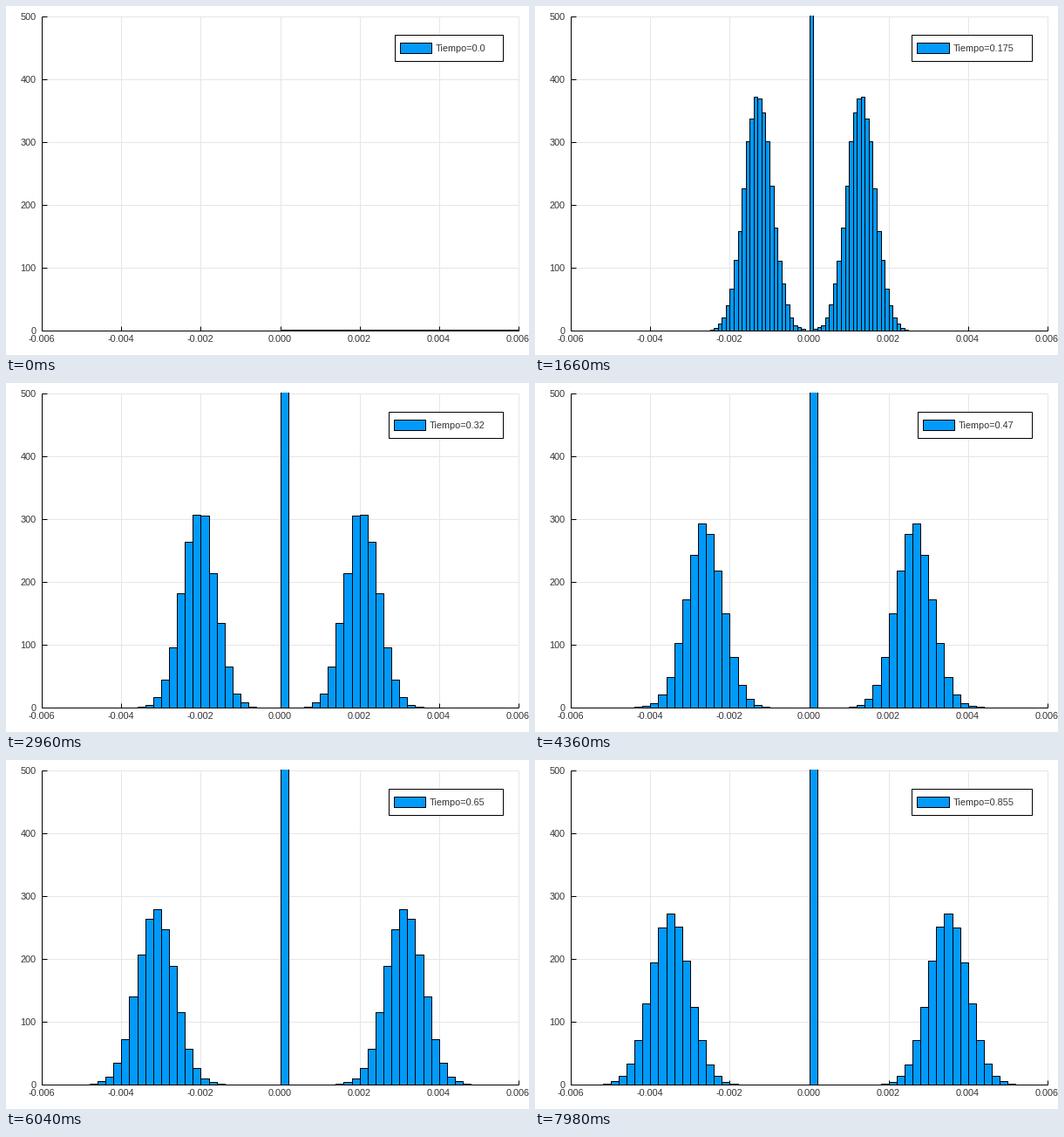
Recreate the animation shown at these times as a matplotlib script. Size 600 by 400 pixels, loop 8 s.

```python
import math
import numpy as np
import matplotlib.pyplot as plt
from matplotlib.animation import FuncAnimation
from matplotlib.collections import LineCollection, PolyCollection
from matplotlib.patches import Rectangle

W, H, DPI = 600, 400, 100
PX = 72 / DPI
LEFT, RIGHT, TOP, BOTTOM = 41.25, 587.85, 12, 372
X_MAX, Y_MAX = 6.0, 500  # x in thousandths
BLUE, INK = "#009afa", "#333333"

# Beam model: particles drift to LIMIT while they diffuse
N, STEPS, DT = 20000, 172, 0.005
LIMIT, TAU, SPREAD = 4.2, 0.475, 0.49
TARGET_BINS = 60

plt.rcParams["font.family"] = "Liberation Sans"
plt.rcParams["font.size"] = 7.8


def to_x(v):
    return LEFT + (v + X_MAX) / (2 * X_MAX) * (RIGHT - LEFT)


def to_y(v):
    return BOTTOM - v / Y_MAX * (BOTTOM - TOP)


def bin_width(t):
    """Round bin width (1, 2 or 5 times a power of ten) for the spread at t."""
    mean = LIMIT * (1 - math.exp(-t / TAU))
    sd = SPREAD * math.sqrt(1 - math.exp(-2 * t / TAU))
    raw = 2 * (mean + 3.86 * sd) / TARGET_BINS
    base = 10 ** math.floor(math.log10(raw))
    for limit, factor in ((1.1, 1), (2.2, 2), (5.5, 5)):
        if raw / base <= limit:
            return base * factor
    return base * 10


def bar(x0, x1, height):
    a, b, y = to_x(x0), to_x(x1), to_y(height)
    return [(a, BOTTOM), (a, y), (b, y), (b, BOTTOM)]


def histogram(pos, t):
    w = bin_width(t)
    k = math.ceil(np.abs(pos).max() / w)
    edges = np.arange(-k, k + 1) * w
    counts = np.histogram(pos, edges)[0]
    counts = counts + counts[::-1]
    counts[k] += N  # undeflected beam
    density = counts / (3 * N * w * 1e-3)
    return [bar(a, b, min(d, 2 * Y_MAX))
            for a, b, d in zip(edges, edges[1:], density)]


def simulate():
    rng = np.random.default_rng(7)
    decay = math.exp(-DT / TAU)
    kick = SPREAD * math.sqrt(1 - decay ** 2)
    pos = np.zeros(N)
    result = [[bar(0, X_MAX, 1)]]
    for i in range(1, STEPS):
        pos = LIMIT + (pos - LIMIT) * decay + kick * rng.standard_normal(N)
        result.append(histogram(pos, i * DT))
    return result


bars_at = simulate()

fig = plt.figure(figsize=(W / DPI, H / DPI), dpi=DPI, facecolor="white")
ax = fig.add_axes([0, 0, 1, 1])
ax.set_xlim(0, W)
ax.set_ylim(H, 0)
ax.axis("off")

grid, marks = [], [[(LEFT, TOP), (LEFT, BOTTOM)], [(LEFT, BOTTOM), (RIGHT, BOTTOM)]]
for v in range(-6, 7, 2):
    x = to_x(v)
    grid.append([(x, TOP), (x, BOTTOM)])
    marks.append([(x, BOTTOM), (x, BOTTOM - 5)])
    ax.text(x - 0.4, 385, f"{v / 1000:.3f}", ha="center", va="baseline", color=INK)
for v in range(0, 501, 100):
    y = to_y(v)
    grid.append([(LEFT, y), (RIGHT, y)])
    marks.append([(LEFT, y), (LEFT + 6, y)])
    ax.text(34.4, y + 4, str(v), ha="right", va="baseline", color=INK)
ax.add_collection(LineCollection(grid, colors="#e6e6e6", linewidths=PX, zorder=1))
ax.add_collection(LineCollection(marks, colors="black", linewidths=PX, zorder=2))

bars = PolyCollection([], facecolors=BLUE, edgecolors="black", linewidths=PX, zorder=3)
ax.add_collection(bars)
bars.set_clip_path(Rectangle((LEFT, TOP - 1), RIGHT - LEFT + 1, BOTTOM - TOP + 1,
                             transform=ax.transData))

frame = Rectangle((446, 33), 124, 30, fc="white", ec="black", lw=PX, zorder=4)
swatch = Rectangle((452, 42), 36.2, 12, fc=BLUE, ec="black", lw=PX, zorder=5)
ax.add_patch(frame)
ax.add_patch(swatch)
label = ax.text(493, 52, "", va="baseline", color=INK, zorder=5)


def step_at(tick):
    # Every third step is held for five ticks, the others for one
    group, rest = divmod(tick, 7)
    return 3 * group + (rest > 0) + (rest > 5)


def draw(tick):
    i = step_at(tick)
    bars.set_verts(bars_at[i])
    text = f"Tiempo={round(i * DT, 3)}"
    left = 445.9 - 6.75 * (len(text) - 10)
    frame.set_x(left)
    frame.set_width(570 - left)
    swatch.set_x(left + 6)
    label.set_x(left + 46.9)
    label.set_text(text)
    return bars, frame, swatch, label


anim = FuncAnimation(fig, draw, frames=400, interval=20, repeat=True, repeat_delay=0)
plt.show()
```
